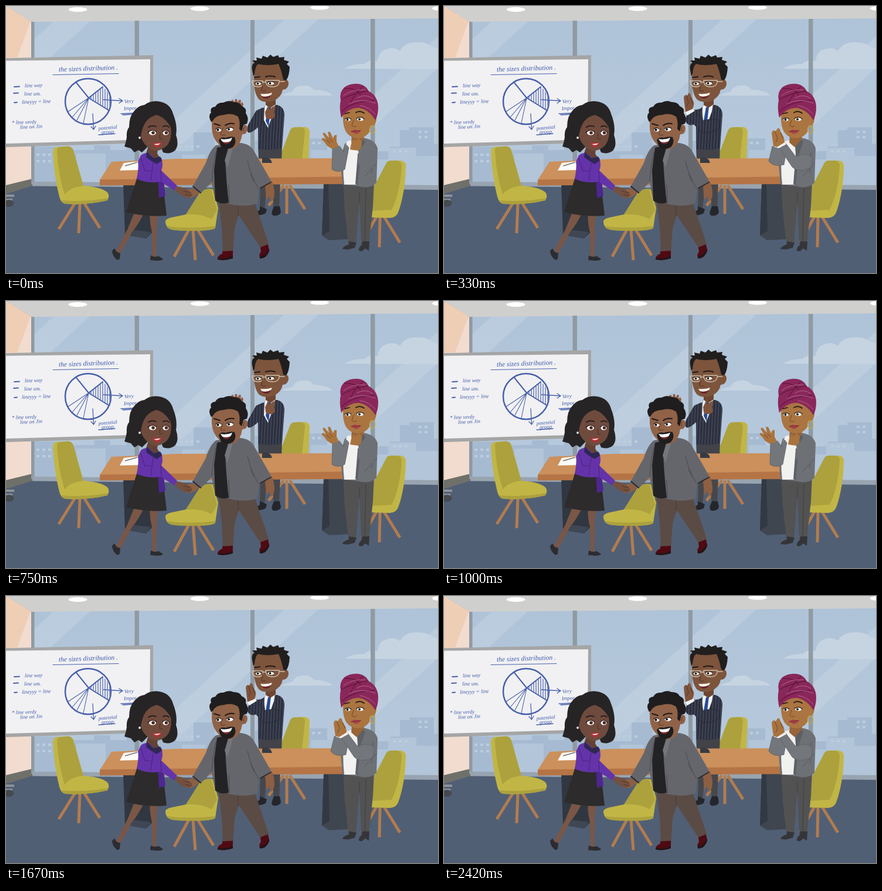
An HTML page that plays this animation: 737x456 px, repeating every 2.51 s.

```html
<!DOCTYPE html>
<html lang="en">
<head>
<meta charset="utf-8">
<title>Office applause</title>
<style>
html,body{margin:0;width:100%;height:100%;overflow:hidden;background:#515f75}
svg{display:block;width:737px;height:456px;animation:clap 2510ms step-end infinite}
.apart{opacity:var(--o)}
.joined{opacity:calc(1 - var(--o))}
@keyframes clap{
  0%,9.96%,19.92%,29.88%,39.84%,49.8%,59.76%,69.72%,79.68%,89.64%{--o:1}
  3.18%,13.14%,23.1%,33.06%,43.02%,52.98%,62.94%,72.9%,82.86%,92.82%,100%{--o:0}
}
.pen{fill:none;stroke:#4860aa;stroke-width:1;stroke-linecap:round}
.note{font:italic 9px "Liberation Serif",serif;fill:#3f58a8}
.legs{fill:none;stroke:#b27c4e;stroke-width:5}
.rim{fill:#c1b645}
.seat{fill:#aca13d}
.brow{fill:none;stroke:#1d1819;stroke-width:2;stroke-linecap:round}
.lid{fill:none;stroke:#1d1819;stroke-width:1.1;stroke-linecap:round}
.fine{fill:none;stroke-width:1;stroke-linecap:round}
</style>
</head>
<body>
<svg viewBox="0 0 737 456">
<defs>
  <linearGradient id="sky" x2="0" y2="1"><stop stop-color="#afc3d8"/><stop offset="1" stop-color="#b8cadd"/></linearGradient>
  <pattern id="pin" width="5" height="8" patternUnits="userSpaceOnUse" patternTransform="rotate(3)"><path fill="#2c303f" d="M0 0h5v8H0z"/><path stroke="#5f6577" stroke-width=".7" d="M2.5 0v8"/></pattern>
  <clipPath id="glass"><path d="M45 27L737 21V308L45 302Z"/></clipPath>
  <clipPath id="slice"><path d="M141 157L165 138Q178 148 178 164L175 178Z"/></clipPath>
</defs>

<!-- room -->
<path fill="#cfcfce" d="M0 0H737V24L45 28Z"/>
<g fill="#fff"><ellipse cx="122.500" cy="6" rx="16" ry="4"/><ellipse cx="330.500" cy="4.500" rx="16" ry="4"/><ellipse cx="535" cy="2.800" rx="16" ry="3.800"/><ellipse cx="741" cy="4" rx="14" ry="4"/></g>
<path fill="#f2dccf" d="M0 0L45 28V297L0 310Z"/>
<path fill="#efceb6" d="M0 0L42 26L19 88H0Z"/>
<path fill="#6f7069" d="M0 306L45 295V308L0 321Z"/>
<path fill="#515f75" d="M0 321L45 307L737 313V456H0Z"/>
<g clip-path="url(#glass)">
  <path fill="url(#sky)" d="M45 20H737V310H45Z"/>
  <g fill="#c8d5e2" opacity=".45">
    <path d="M478 20H536L300 236H242ZM88 20H150L45 116V60ZM737 52V106L629 204V150Z"/>
  </g>
  <path fill="#c6d4e2" d="M578 107Q592 98 612 99Q618 91 634 94Q636 76 652 73Q663 70 672 77Q680 62 700 62Q718 61 728 70L737 73V108ZM470 153Q478 148 488 147Q494 135 508 136Q518 134 525 143Q550 144 557 153Z"/>
  <path fill="#a6bbd1" d="M45 240H92V246H150V238H178V246H205V208H250V232H290V248H320V216H356V246H424V230H430V302H45ZM474 240H505V226H548V246H580V302H474ZM629 248H655V240H672V212H688V207H730V235H737V310H629Z"/>
  <path fill="#b2c5d9" d="M629 262H652V242H700V256H737V310H629ZM520 246H560V302H520ZM120 252H170V302H120ZM300 254H340V270H300Z"/>
  <g fill="none" stroke="#bccdde" stroke-width="4" stroke-dasharray="5 5"><path d="M704 215H722M704 224H722M660 248H690M52 254H85M52 265H85M300 225H318M512 234H540M285 240H330"/></g>
</g>
<path fill="#8f9aa3" d="M43 27H48.500V304H43ZM219.500 25H227V304H219.500ZM417 24H424V304H417ZM622 22H629.500V306H622Z"/>
<path fill="#98a4b0" d="M45 300L737 306V314L45 307.500Z"/>

<!-- whiteboard -->
<path fill="#8d9295" d="M0 322H14V326H0ZM0 329H11V332H0Z"/><ellipse cx="5" cy="337" rx="8.500" ry="6" fill="#464b50"/>
<path fill="#a4a5a5" d="M0 89L251 84V233.500L0 241Z"/>
<path fill="#f1f1f3" d="M0 93.500L246 91L245 228L0 235Z"/>
<g class="pen">
  <ellipse cx="140" cy="163" rx="39" ry="39" stroke-width="2.500"/>
  <path stroke-width="2" d="M120 131L141 157L165 138M141 157L175 178"/>
  <path stroke-width="1.100" d="M141 157L105 181M141 157L113 190M141 157L121 195M141 157L132 200M80 117.500L192 115.500"/>
  <path clip-path="url(#slice)" stroke-width="1.200" d="M145 130V182M149 130V182M153 130V182M157 130V182M161 130V182M165 130V182M169 130V182M173 130V182M177 130V182"/>
  <path stroke-width="1.300" d="M166 160L199 162M193 158L199 162L193 166M148 184L149.500 211M145 206L149.500 211L153 205M196 184L217 183M199 186L215 185M158 220L186 218"/>
  <path stroke-width="1.800" d="M14 138L23 137.500M13 149L21 148.500M14 165L19 164.500"/>
</g>
<g class="note">
  <text transform="translate(90 112) rotate(-2)" style="font-size:11.500px">the sizes distribution .</text>
  <text transform="translate(32 139) rotate(-2)">line way</text><text transform="translate(31 153) rotate(-1)">line um.</text><text transform="translate(27 167) rotate(-2)">lineyyy = line</text>
  <text transform="translate(10 202) rotate(-2)">* line verdy</text><text transform="translate(24 210) rotate(-3)">line on Jin</text>
  <text transform="translate(202 166) rotate(-3)">Very</text><text transform="translate(201 178) rotate(-3)">Impor</text>
  <text transform="translate(158 212) rotate(-5)">potential</text><text transform="translate(163 218.500) rotate(-3)">group</text>
</g>

<!-- chairs behind -->
<path class="legs" d="M118 336L90 381M126 336L124 388M133 336L160 379"/>
<path class="rim" d="M80 249Q80 241 88 240.500L106 239.500Q113 240 115 247L132 307Q158 309 168 315Q177 319 175 327L173 332Q140 340 102 338Q94 337 91 326Q82 290 80 249Z"/>
<path class="seat" d="M87 245Q88 241 95 240.500L106 239.500Q113 240 115 247L132 307Q110 309 100 322Q88 282 87 245ZM95 332Q135 335 174 328L172 332Q140 340 102 338Q97 337 95 332Z"/>
<path class="legs" d="M474 306L448 341M479 306L479 355M484 306L510 347"/>
<path class="rim" d="M484 214Q486 207 494 207L510 206.500Q518 208 518 215L516 261H466Z"/>
<path class="seat" d="M484 214Q486 207 494 207L504 207Q510 208 510 215L505 261H466Z"/>

<!-- man with glasses -->
<g>
  <path fill="#46474b" d="M434 300H446L441 348L433 347ZM452 300H468L466 345H457Z"/>
  <path fill="#25262c" d="M433 342L445 347L443 354Q434 359 427 356Q427 351 433 348ZM457 342H467L469 352Q467 359 456 358Q452 355 454 350Z"/>
  <path fill="#414349" d="M430 240H471L470 266H431Z"/>
  <path fill="url(#pin)" d="M430 180L446 169L463 169Q475 173 475 186L471 243Q450 248 430 244Z"/>
  <path fill="#f2f3f6" d="M441 173L447 165L459 168L457 180L447 208L440 195Z"/>
  <path fill="#284b93" d="M447 173L452 172L451 180L448 206L443 196Z"/>
  <path fill="#6e4631" d="M443 154H460V168L451 174L443 169Z"/>
  <path fill="#7d543c" d="M424 98Q440 92 469 96L473 126Q483 124 482 134Q480 143 472 143Q470 156 456 162Q440 167 431 159Q424 150 423 132Z"/>
  <path fill="#211e1e" d="M420 110Q418 99 424 97L420 93L428 93L427 88L436 90L438 85L446 88L451 83L456 87L464 84L466 88L475 87L474 92L483 95L479 99L484 104Q483 121 478 127L473 126Q470 110 465 99Q445 103 430 99Q425 103 424 116L422 120Z"/>
  <g fill="#f7f2ea"><ellipse cx="430.500" cy="132.500" rx="4.500" ry="2.600"/><ellipse cx="452" cy="132" rx="5.500" ry="2.800"/><path d="M434 150Q446 151 454 148Q451 157 443 157Q437 156 434 150Z"/></g>
  <path fill="#682126" d="M436 154Q446 156 452 152Q450 158 443 158Q438 157 436 154Z"/>
  <circle cx="429.500" cy="132.500" r="1.800"/><circle cx="450.500" cy="132" r="1.800"/>
  <path class="brow" d="M424 122L433 121M443 121Q451 118 459 121"/>
  <path class="lid" d="M426 130Q430 128 435 130.500M446 130.500Q452 127 458 130.500"/>
  <path class="fine" stroke="#cdbfae" style="stroke-width:1.300" d="M420 128H438Q440 138 430 138Q420 138 420 128ZM443 127H466Q467 138 454 138Q443 138 443 127ZM438 130H443M466 129L475 129"/>
  <path class="fine" stroke="#4e2f22" d="M438 132L436 144Q439 147 443 145"/>
  <g class="apart">
    <path fill="#8e5c42" d="M384 162L387 160L390 165L391 159L394 159L395 165L398 160L401 161L400 167L403 164L405 168L402 180L386 178Z"/>
    <path fill="url(#pin)" stroke="#222633" stroke-width=".7" d="M438 174L427 179L414 202Q409 213 414 216Q420 217 437 200Z"/>
    <path fill="url(#pin)" d="M456 188L463 184L474 190L471 213Q460 214 452 203Z"/>
    <path fill="#80543c" d="M443 190L442 181L445 175L447 169L449 177L455 172L460 170L457 181L459 188L455 193H446Z"/>
  </g>
  <g class="joined">
    <path fill="url(#pin)" stroke="#222633" stroke-width=".7" d="M439 176L420 179L411 193Q413 203 422 203L442 198Z"/>
    <path fill="url(#pin)" stroke="#222633" stroke-width=".7" d="M414 187L427 177L441 196Q462 190 470 197L469 209Q446 222 436 213Z"/>
    <path fill="#f2f3f6" d="M411 181L424 174L428 179L415 187Z"/>
    <path fill="#80543c" d="M412 181L410 165L409 156Q411 150 415 153L417 149Q420 148 421 153L426 164Q427 169 424 176Z"/>
    <path class="fine" stroke="#56372a" d="M414 154L417 165L414 171M421 157L424 166"/>
  </g>
</g>

<!-- table -->
<path fill="#303740" d="M200 304H249V387L239 397L203 391Z"/><path fill="#3e4753" d="M204 391L214 382L247 386L239 397Z"/>
<path fill="#3f4650" d="M542 304H590V398L551 400L539 392Z"/><path fill="#323942" d="M542 304H550L552 384L539 392Z"/>
<path fill="#cb905b" d="M180 266L290 261L555 260H604V293L160 297Z"/>
<path fill="#b57445" d="M160 296.500L604 291V304L160 306.500Z"/>
<path fill="#fbfbf8" d="M201 268L229 265L231 280L194 281Z"/><path d="M203 273L224 267" stroke="#76736f" stroke-width="1.600"/>
<path fill="#363b44" d="M437 260Q446 257 452 263L454 268H437Z"/>

<!-- front chairs -->
<path class="legs" d="M312 382L287 428M319 382L323 434M327 382L354 426"/>
<path class="rim" d="M272 367Q274 362 288 360L307 356L331 318Q343 310 353 313L362 345L357 379Q350 386 290 383Q271 381 272 367Z"/>
<path class="seat" d="M307 356L331 318Q340 311 350 313L360 348L351 364Q332 354 307 356ZM274 376Q310 381 357 376L356 380Q340 386 290 383Q276 382 274 376Z"/>
<path class="legs" d="M632 360L607 404M638 360L637 412M645 360L672 404"/>
<path class="rim" d="M648 270Q650 264 657 264L674 264Q683 266 682 275Q681 318 670 350Q667 361 655 362L622 361V320Z"/>
<path class="seat" d="M648 270Q650 264 657 264L668 264Q676 266 675 275Q672 320 658 348L622 350V320Z"/>

<!-- woman in purple -->
<g>
  <path fill="#7a5646" d="M220 350L236 352Q227 372 215 386L195 422L188 419L207 382ZM246 352H260Q257 371 257 388L256 430H250L249 386Q244 366 246 352Z"/>
  <path fill="#2c2c30" d="M185 414L189 420L195 422L194 432L190 434Q181 427 181 418ZM247 426Q255 430 260 427L268 432Q267 435 258 435L246 434Z"/>
  <path fill="#272425" d="M236 169Q247 161 261 163Q280 166 285 184Q293 204 290 220Q296 238 288 247Q279 254 268 250L264 240L242 240L232 250L226 246L219 250L213 243L202 240Q205 232 206 224Q205 213 210 207Q210 188 219 179Q226 170 236 169Z"/>
  <path fill="#634235" d="M243 238H260L258 252L264 262L250 268L239 252Z"/>
  <path fill="#6f4b3e" d="M230 203Q236 190 252 185Q274 188 281 205Q284 226 275 238Q262 250 250 246Q234 238 230 222Z"/>
  <path fill="#272425" d="M228 222Q226 204 235 188L250 177Q276 178 283 212Q274 191 257 186Q242 190 236 202Q232 210 230 222Z"/>
  <ellipse cx="250" cy="216.500" rx="6" ry="4" fill="#fff"/><ellipse cx="272.500" cy="216.500" rx="5" ry="4" fill="#fff"/>
  <circle cx="251" cy="216.500" r="2.800" fill="#4d2c20"/><circle cx="273.500" cy="216.500" r="2.800" fill="#4d2c20"/>
  <path class="brow" style="stroke-width:1.700" d="M243 207Q249 203 256 206M268 206Q274 203 278 207"/><path class="lid" d="M242 216Q249 209 257 215M267 215Q273 209 279 216"/>
  <path class="fine" stroke="#492d25" d="M263 218L262 226Q264 229 267 226"/>
  <path fill="#b52f38" d="M249 235Q257 232 261 234L266 233Q263 242 256 241.500Z"/><path fill="#f3e9e6" d="M252 236L264 234.500Q260 238 256 237.500Z"/>
  <circle cx="228" cy="225" r="1.900" fill="#f5f1f2"/>
  <path fill="#2d2b2b" d="M224 292L267 297L274 358Q240 361 205 352Z"/>
  <path fill="#4d2690" d="M259 290L269 298L272 324L261 328Z"/>
  <path fill="#6433a9" d="M230 255Q238 249 245 252L255 262L265 259Q269 272 265 281L292 307L287 315L264 300Q242 304 223 295Q227 274 225 266Z"/>
  <path fill="#2f2853" d="M240 249L252 260L263 257L266 264L257 270L247 264L239 258Z"/>
  <path class="fine" stroke="#47227f" d="M251 268L247 298M238 281L247 282M264 281L265 299M230 260L237 282"/>
</g>

<!-- man in grey -->
<g>
  <path fill="#5b4b45" d="M362 333L408 328L424 336Q433 360 448 406L435 414L397 357L390 380L387 424H369Q371 388 362 333Z"/>
  <path class="fine" stroke="#463a36" d="M396 340V358"/>
  <path fill="#4f0a12" d="M369 419L387 418V430Q373 435 361 432Q361 426 369 423ZM434 412L447 407L449 417Q443 432 433 430Q431 424 435 420Z"/>
  <path fill="#241317" d="M361 430Q373 433 387 427V431Q373 436 361 433ZM433 428Q443 426 449 414V419Q443 433 433 431Z"/>
  <path fill="#8d5f43" d="M442 307L454 300Q460 316 457 328L452 335L449 325L444 332Z"/>
  <path fill="#65666c" d="M358 238L386 234Q411 231 421 244L453 300L432 312L429 337Q406 345 377 337L357 333L351 301L332 320L318 309L341 268Q347 247 358 238Z"/>
  <path fill="#232326" d="M360 242L382 237L374 262Q376 302 380 336Q366 340 357 332L355 280Z"/>
  <path fill="#75767b" d="M381 237L389 236L378 276L373 264Z"/>
  <path class="fine" stroke="#49494f" d="M358 250Q352 275 351 299M412 265Q418 291 431 312M380 306L381 336M417 287L423 300"/>
  <path class="fine" stroke="#2a2a2d" style="stroke-width:2" d="M319 308L332 319M434 311L452 301"/>
  <path fill="#8d5f43" d="M319 311L330 319L320 326Q310 331 302 324L305 315Z"/>
  <path fill="#73503f" d="M291 308Q302 309 310 314L318 321L313 328L301 325L288 315Z"/>
  <path class="fine" stroke="#543626" d="M303 316L315 319M306 322L317 324"/>
  <path fill="#906247" d="M351 190Q370 178 400 186L404 203Q412 201 412 210Q411 220 403 219Q401 236 389 243Q373 248 363 236Q352 226 351 209Z"/>
  <path fill="#1f1d1e" d="M350 198Q344 187 350 182Q347 173 357 172Q361 164 371 165Q380 160 388 164Q399 164 402 171Q411 174 409 183Q415 191 411 201L405 203L402 214L398 210Q400 198 396 189Q385 182 372 186Q358 186 353 196Z"/>
  <path fill="#1f1d1e" d="M363 229Q366 223 375 225Q383 222 390 224Q394 234 387 241Q376 248 367 240Q365 236 363 229Z"/>
  <path fill="#fff" d="M366 227Q376 229 386 225Q383 235 375 235Q369 233 366 227Z"/><path fill="#7b272b" d="M369 232Q377 234 383 231Q381 236 375 236Q371 235 369 232Z"/>
  <ellipse cx="363" cy="211.500" rx="4.500" ry="3" fill="#fff"/><ellipse cx="382" cy="210.500" rx="5.500" ry="3.200" fill="#fff"/><circle cx="361.500" cy="211.500" r="2"/><circle cx="380" cy="210.500" r="2"/>
  <path class="brow" d="M355 201L365 204M374 204Q381 199 389 201"/>
  <path class="lid" d="M358 210Q363 206 367 210.500M376 209.500Q382 205 388 209"/>
  <path class="fine" stroke="#573725" d="M370 209L366 219Q368 222 374 220M407 207Q403 210 406 214"/>
</g>

<!-- woman with headwrap -->
<g>
  <path fill="#525253" d="M575 298L628 300L626 342L619 407H606L603 332L597 406H584L578 350Z"/>
  <path class="fine" stroke="#3f3f40" d="M603 318V336M614 312L612 402"/>
  <path fill="#353538" d="M585 402L598 404L595 413L583 416L574 415Q574 411 585 407ZM608 402H620L619 418L613 414L607 419L602 418Q601 413 607 408Z"/>
  <path fill="#6d7075" d="M578 235L608 225Q629 227 634 243L632 302Q621 313 602 308L574 305L570 261Z"/>
  <path fill="#f1f1f0" d="M582 231L605 225L602 250L599 305H577Q574 278 576 250Z"/>
  <path fill="#5d6064" d="M607 225L613 232L605 255L600 306L596 304L600 254L599 240Z"/>
  <path class="fine" stroke="#55585c" d="M626 250L624 286M632 269L612 291"/>
  <path fill="#996437" d="M590 221L612 216L610 228L598 241L589 233Z"/>
  <path fill="#aa7541" d="M575 186L582 168H622L629 183Q635 193 629 203L622 207Q621 220 607 225Q590 229 580 215Q574 204 575 186Z"/>
  <path fill="#8a275a" d="M572 191Q568 173 571 161Q568 148 577 139Q590 130 606 134Q616 138 618 145Q634 153 635 172Q635 187 630 195Q620 178 603 174Q584 173 572 191Z"/>
  <path class="fine" stroke="#671743" style="stroke-width:1.400" d="M572 160Q591 149 618 145M573 180Q590 163 628 161M578 141Q597 139 605 152M587 167Q592 154 609 137"/>
  <path class="fine" stroke="#b0678b" d="M576 153Q589 142 613 143M585 167Q607 156 630 166M604 170Q619 172 630 185M599 157Q613 149 626 158"/>
  <ellipse cx="583.500" cy="194" rx="4.200" ry="2.500" fill="#fff"/><ellipse cx="604.500" cy="193.500" rx="5.500" ry="2.700" fill="#fff"/><circle cx="582.500" cy="194" r="1.900"/><circle cx="603" cy="193.500" r="1.900"/>
  <path class="brow" style="stroke-width:1.700" d="M578 184L586 182M597 182Q604 178 611 183"/><path class="lid" d="M578 193Q583 189 589 193M598 192Q605 187 611 193"/>
  <path class="fine" stroke="#704726" d="M593 195L590 204Q593 208 598 205"/>
  <path fill="#a8434a" d="M588 214L595 211L598 212L606 212Q602 219 596 218.500Z"/><path class="fine" stroke="#742a31" d="M589 214.500L605 213"/>
  <ellipse cx="625" cy="211" rx="4.500" ry="6.500" fill="none" stroke="#c9a83a" stroke-width="1.400"/>
  <g class="apart">
    <path fill="#73767a" stroke="#5a5d61" stroke-width=".7" d="M557 243L569 239L576 249L581 237L585 242L578 279Q566 286 556 279Z"/>
    <path fill="#a9733f" d="M556 244L548 239L542 231L538 228L541 225L546 228L540 218L543 216L551 225L549 215L553 215L558 226L560 221L564 220L564 232L568 240Z"/>
    <path class="fine" stroke="#704726" d="M547 229L553 234M552 227L557 232"/>
    <path fill="#a9733f" d="M587 245L589 235L593 227L596 231L602 226L607 231L606 242L600 249Z"/>
    <path fill="#f1f1f0" d="M585 245L601 247L602 252L584 250Z"/>
    <path fill="#6d7075" d="M602 246L611 236L629 246L627 276Q611 282 600 268Z"/>
  </g>
  <g class="joined">
    <path fill="#73767a" stroke="#5a5d61" stroke-width=".7" d="M560 240L570 237L584 248L580 271Q562 276 554 265Z"/>
    <path fill="#73767a" stroke="#5a5d61" stroke-width=".7" d="M570 239L582 233L600 257Q619 248 629 260L626 276Q605 286 594 275Z"/>
    <path fill="#f1f1f0" d="M562 240L581 231L584 236L571 243Z"/>
    <path fill="#a9733f" d="M562 239L560 225L559 217Q561 210 566 214L569 209Q573 208 574 214L580 225L581 233L568 241Z"/>
    <path class="fine" stroke="#704726" d="M565 215L569 226L566 233M574 216L578 225"/>
  </g>
</g>
</svg>
</body>
</html>
```
